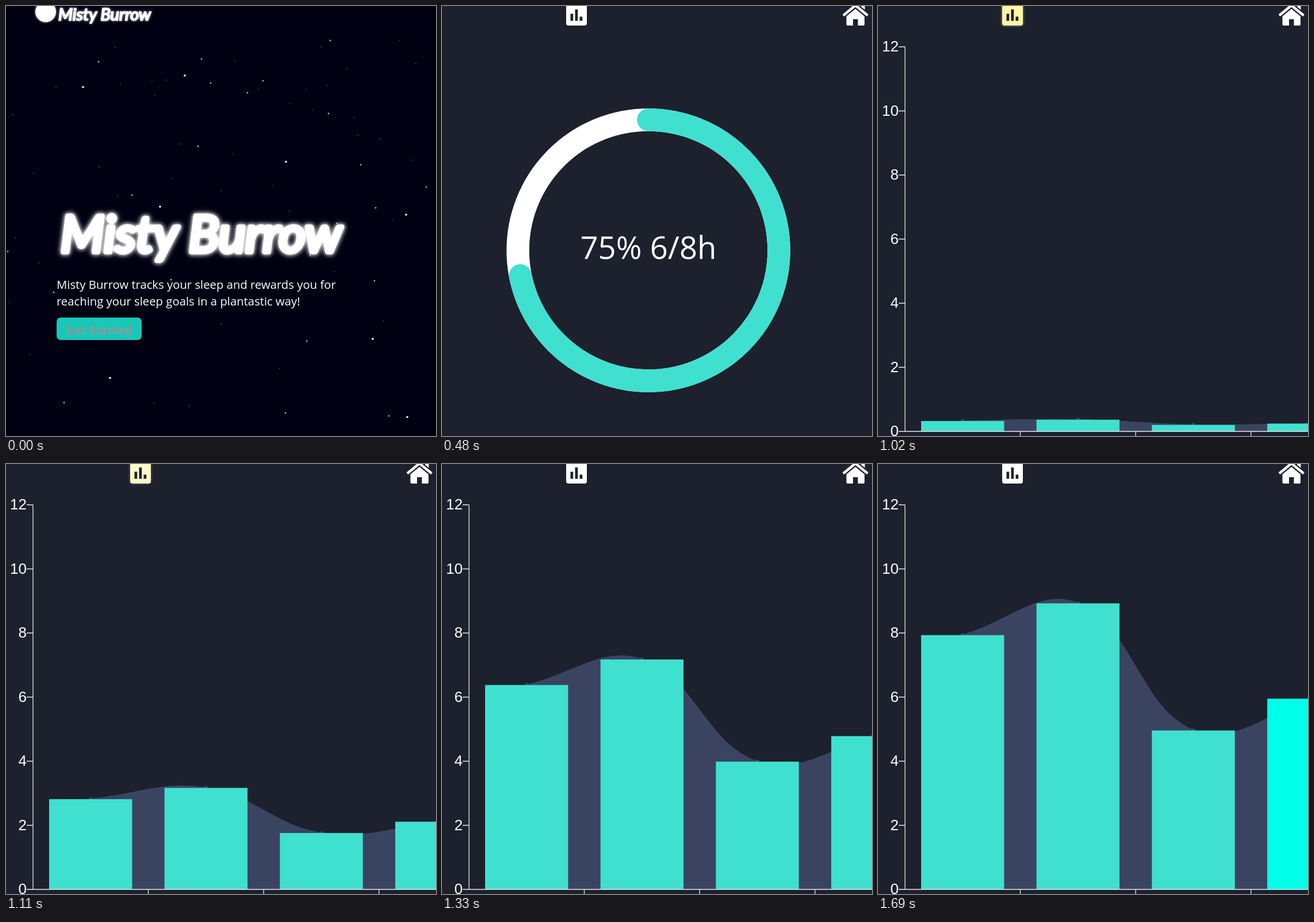
These frames come from a looping animation (748 px wide and 748 px high, 1730 ms). An HTML page:

```html
<!DOCTYPE html>
<html lang="en">
<head>
<meta charset="utf-8">
<title>Sleep tracker</title>
<style>
  html, body { margin: 0; width: 100%; height: 100%; overflow: hidden; background: #1c212d; }
  svg { display: block; width: 100vw; height: 100vh; }
  text { fill: #fff; }
  .ui { font-family: "Open Sans", "Noto Sans", sans-serif; }
  .axis { font: 26px "Liberation Sans", Arial, sans-serif; text-anchor: end; }
  .tip { font: 12px "Liberation Sans", Arial, sans-serif; }
  .brand { font-family: Lato, "Open Sans", sans-serif; font-style: italic;
           stroke: #fff; stroke-linejoin: round; stroke-linecap: round; }
</style>
</head>
<body>
<svg viewBox="0 0 748 748" preserveAspectRatio="none">
  <g id="home">
    <rect width="748" height="748" fill="#000012"/>
    <path id="small" fill="#5d5f70"/>
    <path id="medium" fill="#b4b6c2"/>
    <path id="large" fill="#fff"/>
    <g style="filter: drop-shadow(0 0 2px #fffa)">
      <circle cx="69" cy="10" r="18" fill="#fff"/>
      <text class="brand" x="91" y="25" font-size="29" stroke-width="2.2">Misty Burrow</text>
    </g>
    <text class="brand" x="95" y="428" font-size="88" stroke-width="8"
      style="filter: drop-shadow(0 0 3px #fff) drop-shadow(0 0 4px #fff8)">Misty Burrow</text>
    <g class="ui" font-size="20.3">
      <text x="88" y="492">Misty Burrow tracks your sleep and rewards you for</text>
      <text x="88" y="520.5">reaching your sleep goals in a plantastic way!</text>
    </g>
    <rect x="88" y="542" width="148" height="39" rx="7" fill="#18c7b8"/>
    <text class="ui" x="105" y="571" font-size="20" font-weight="700" style="fill:#97979b">Get Started</text>
  </g>

  <g id="app">
    <rect width="748" height="748" fill="#1c212d"/>
    <g id="ringPage">
      <g fill="none" stroke-width="39.5" transform="rotate(-90 359 425)">
        <circle cx="359" cy="425" r="227" stroke="#fff"/>
        <circle id="ring" cx="359" cy="425" r="227" stroke="#40e0d0" stroke-linecap="round" pathLength="100"/>
      </g>
      <text id="score" class="ui" x="359" y="440" font-size="54.5" text-anchor="middle"></text>
    </g>
    <g id="chartPage">
      <path id="area" fill="#3a4360"/>
      <path id="curve" fill="none" stroke="#3d4562" stroke-width="2"/>
      <g id="dots" fill="#464e60"></g>
      <g id="bars"></g>
      <path id="axes" fill="none" stroke="#e8e9ea" stroke-width="1.3"/>
      <g id="labels" class="axis"></g>
      <g id="tip">
        <path d="M552 516l5-5v10z"/>
        <rect x="556" y="495" width="126" height="43" rx="6"/>
        <text class="tip" x="563" y="510" font-weight="700">Wed</text>
        <rect x="563" y="520" width="12" height="12" fill="#40e0d0"/>
        <text class="tip" x="579" y="530">Hours of Sleep: 5</text>
      </g>
    </g>
    <rect id="badge" x="216" y="-3" width="36" height="37" rx="4"/>
    <path fill="#1c212d" d="M223.5 13.5h4.7v12.2h-4.7zM231.5 6h4.7v19.7h-4.7zM239.5 18.5h4.7v7.2h-4.7z"/>
    <g fill="#fff">
      <path d="M729 -4h6.5v16l-6.5-5z"/>
      <path d="M719.2 4.5L735 17.5V32q0 2-2 2h-9.500V23h-8.500v11h-9.500q-2 0-2-2V17.500z"/>
      <path d="M698 16.500L719.200 -1L740.500 16.500" fill="none" stroke="#1c212d" stroke-width="9"/>
      <path d="M698 16.500L719.200 -1L740.500 16.500" fill="none" stroke="#fff" stroke-width="4.500" stroke-linejoin="round"/>
    </g>
  </g>
</svg>
<script>
const LOOP = 1730, RING_AT = 200, ADD_AT = 250, CHART_AT = 1000;
const NS = 'http://www.w3.org/2000/svg';
const $ = id => document.getElementById(id);
const clamp = v => Math.min(1, Math.max(0, v));
const set = (el, attrs) => { for (const k in attrs) el.setAttribute(k, attrs[k]); return el; };
const add = (parent, tag, attrs) => parent.appendChild(set(document.createElementNS(NS, tag), attrs));
const show = (id, on) => { $(id).style.display = on ? '' : 'none'; };

// Linear interpolation through [time, value] steps.
function ramp(t, steps) {
  if (t <= steps[0][0]) return steps[0][1];
  for (let i = 1; i < steps.length; i++) {
    const [t0, a] = steps[i - 1], [t1, b] = steps[i];
    if (t <= t1) return a + (b - a) * (t - t0) / (t1 - t0);
  }
  return steps[steps.length - 1][1];
}

const mix = (a, b, k) => `rgb(${a.map((v, i) => Math.round(v + (b[i] - v) * k))})`;

// CSS "ease": cubic-bezier(.25, .1, .25, 1)
function ease(x) {
  const curve = (u, a, b) => 3 * u * (1 - u) ** 2 * a + 3 * u * u * (1 - u) * b + u ** 3;
  let lo = 0, hi = 1;
  for (let i = 0; i < 24; i++) {
    const mid = (lo + hi) / 2;
    if (curve(mid, .25, .25) < x) lo = mid; else hi = mid;
  }
  return curve(lo, .1, 1);
}

// Star layers: positions, size and upward speed in px per second.
const layers = [
  { id: 'small', size: 1.6, speed: 40, xy: [
    190,72, 548,71, 685,60, 713,100, 593,109, 398,96, 87,141, 199,136, 254,129, 278,129,
    259,155, 439,145, 522,145, 558,138, 494,170, 533,181, 605,194, 12,189, 613,225, 650,231,
    304,240, 394,257, 705,268, 162,280, 48,291, 288,300, 463,312, 374,321, 194,330, 493,357,
    672,372, 16,403, 57,447, 571,462, 6,515, 374,553, 657,548, 42,606, 476,631, 258,691, 319,696] },
  { id: 'medium', size: 2.3, speed: 20, xy: [
    161,97, 340,92, 356,134, 447,130, 564,60, 420,151, 561,187, 334,244, 617,276, 731,315, 219,329,
    643,351, 576,378, 641,478, 529,434, 523,583, 486,708, 101,690, 666,713, 83,498, 3,427, 287,476] },
  { id: 'large', size: 3.2, speed: 13.3, xy: [
    134,141, 311,121, 487,271, 268,349, 696,363, 638,579, 181,647, 698,715] }
];
for (const { id, size, xy } of layers) {
  let d = '';
  for (let i = 0; i < xy.length; i += 2)
    d += `M${xy[i] - size / 2} ${xy[i + 1] - size / 2}h${size}v${size}h${-size}z`;
  set($(id), { d });
}

// Chart
const hours = [8, 9, 5, 6, 8], BASE = 740, UNIT = 55.75, STEP = 200.7, FIRST = 147.2;
const TEAL = [64, 224, 208], BRIGHT = [0, 255, 232];
const bars = hours.slice(0, 4).map((h, i) =>
  add($('bars'), 'rect', { x: FIRST + i * STEP - 72.2, width: 144.4 }));
const dots = hours.slice(0, 4).map((h, i) => add($('dots'), 'circle', { cx: FIRST + i * STEP, r: 3.2 }));

let axes = `M47 71V${BASE}M36 ${BASE}H748`;
for (let v = 0; v <= 12; v += 2) {
  const y = BASE - v * UNIT;
  axes += `M36 ${y}H47`;
  add($('labels'), 'text', { x: 36, y: y + 8 }).textContent = v;
}
for (let i = 1; i < 4; i++) axes += `M${46.8 + i * STEP} ${BASE}v8`;
set($('axes'), { d: axes });

// Smooth curve with tension 0.4, handles split by neighbour distance.
function smooth(pts) {
  const handles = pts.map((p, i) => {
    const a = pts[i - 1] || p, b = pts[i + 1] || p;
    const da = Math.hypot(p[0] - a[0], p[1] - a[1]), db = Math.hypot(b[0] - p[0], b[1] - p[1]);
    const at = k => [p[0] + k * (b[0] - a[0]), p[1] + k * (b[1] - a[1])];
    return { before: at(-.4 * da / (da + db)), after: at(.4 * db / (da + db)) };
  });
  return pts.slice(1).reduce((d, p, i) =>
    d + `C${handles[i].after} ${handles[i + 1].before} ${p}`, 'M' + pts[0]);
}

function drawChart(t) {
  const grow = 1 - (1 - clamp((t - 1011) / 973)) ** 4;
  const pts = hours.map((h, i) => [FIRST + i * STEP, BASE - h * UNIT * grow]);
  const line = smooth(pts);
  set($('curve'), { d: line });
  set($('area'), { d: `${line}V${BASE}H${FIRST}z` });
  const hover = [0, 0,
    ramp(t, [[1340, 0], [1410, .6], [1510, 0]]),
    ramp(t, [[1560, 0], [1650, 1]])];
  bars.forEach((bar, i) => {
    set(bar, { y: pts[i][1], height: BASE - pts[i][1], fill: mix(TEAL, BRIGHT, hover[i]) });
    set(dots[i], { cy: pts[i][1] });
  });
  set($('tip'), { opacity: ramp(t, [[1340, 0], [1430, .45], [1530, .08], [1555, 0]]) });
}

function drawRing(t) {
  const k = ease(clamp((t - ADD_AT) / 500));
  set($('ring'), { 'stroke-dasharray': `${62 + 13 * k} 100` });
  $('score').textContent = t < ADD_AT ? '62% 5/8h' : '75% 6/8h';
}

function draw(t) {
  show('home', t < RING_AT);
  show('app', t >= RING_AT);
  show('ringPage', t < CHART_AT);
  show('chartPage', t >= CHART_AT);
  if (t < RING_AT)
    for (const { id, speed } of layers) set($(id), { transform: `translate(0 ${-speed * t / 1000})` });
  else if (t < CHART_AT) drawRing(t);
  else drawChart(t);
  const glow = ramp(t, [[830, 0], [960, 1], [1040, 1], [1110, .6], [1230, 0]]);
  set($('badge'), { fill: mix([255, 255, 255], [255, 247, 165], glow) });
  $('badge').style.filter = glow ? `drop-shadow(0 0 2px rgba(255,247,165,${glow * .6}))` : 'none';
}

const start = performance.now();
function tick() {
  draw((performance.now() - start) % LOOP);
  requestAnimationFrame(tick);
}
tick();
</script>
</body>
</html>
```
